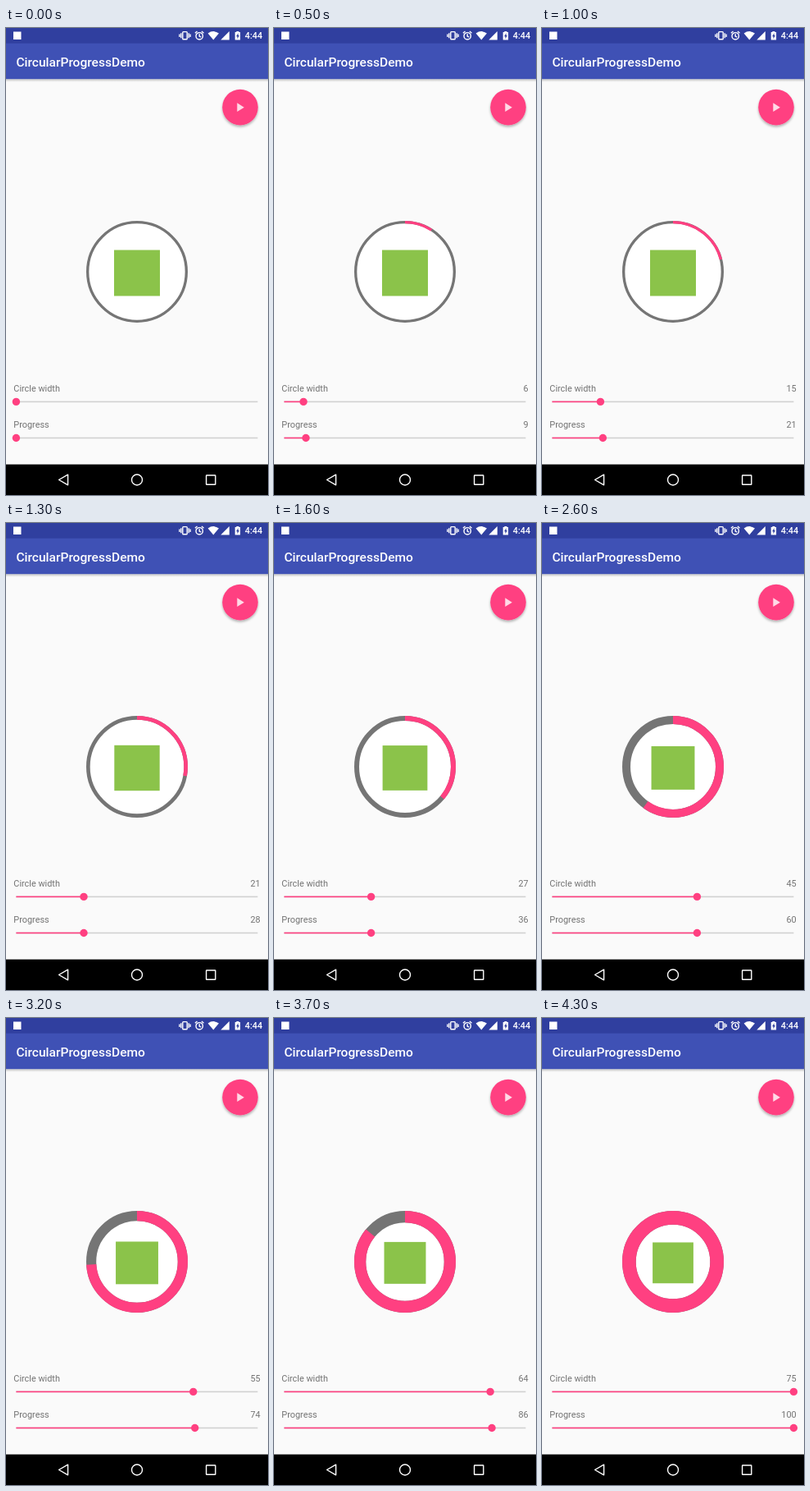
These frames come from a looping animation (320 by 569 pixels, 4400 ms). An HTML page:

```html
<!DOCTYPE html>
<html lang="en">
<head>
<meta charset="utf-8">
<title>CircularProgressDemo</title>
<style>
  html, body { margin: 0; width: 100%; height: 100%; overflow: hidden; background: #fafafa; }
  svg { display: block; width: 100%; height: 100%; }
  text { font: 10.89px Roboto, sans-serif; fill: #737373; }
  .title { font-size: 15.56px; font-weight: 500; fill: #fff; }
  .clock { font-weight: 500; fill: #fff; }
  .value { text-anchor: end; }
  .accent { fill: #ff4081; }
  .line { fill: none; stroke: #fff; stroke-width: 1.4; }
</style>
</head>
<body>
<svg viewBox="0 0 320 569">
  <defs>
    <linearGradient id="barShadow" x2="0" y2="1">
      <stop stop-color="#000" stop-opacity=".22"/>
      <stop offset="1" stop-color="#000" stop-opacity="0"/>
    </linearGradient>
    <filter id="buttonShadow" x="-30%" y="-30%" width="160%" height="160%">
      <feDropShadow dx="0" dy="2" stdDeviation="1.8" flood-opacity=".3"/>
    </filter>
  </defs>

  <rect width="320" height="569" fill="#fafafa"/>
  <rect y="62.2" width="320" height="3.6" fill="url(#barShadow)"/>
  <rect width="320" height="62.2" fill="#3f51b5"/>
  <rect width="320" height="18.7" fill="#303f9f"/>
  <text class="title" x="12.4" y="46.5">CircularProgressDemo</text>

  <!-- Status bar -->
  <rect x="9" y="4.5" width="9.5" height="9.5" fill="#fff"/>
  <rect class="line" x="215.8" y="4.6" width="5.4" height="9.2" rx=".8"/>
  <path class="line" stroke-width="1" d="M213.8 6.2v6M211.9 7.5v3.4M223.2 6.2v6M225.1 7.5v3.4"/>
  <circle class="line" cx="236.2" cy="9.8" r="4.2"/>
  <path class="line" d="M236.2 7.2v2.8l2 1.2M230.9 6.2l2.6-2.2M241.5 6.2l-2.6-2.2"/>
  <path fill="#fff" d="M246.6 6.4Q253.3 1.8 260 6.4L253.3 14.4ZM262.3 14.4H272.8V3.9Z"/>
  <path fill="#fff" d="M279.7 5h1.7V3.9h3V5h1.7v9.6h-6.4Z"/>
  <path fill="#303f9f" d="M283.6 6.3l-2.5 4h1.4v2.9l2.4-4.1h-1.3Z"/>
  <text class="clock" x="291.8" y="13.3">4:44</text>

  <!-- Play button -->
  <circle class="accent" cx="286" cy="96.6" r="21.8" filter="url(#buttonShadow)"/>
  <path d="M282.3 91.2v10.9l8.6-5.45Z" fill="#fff" opacity=".8"/>

  <!-- Circular progress -->
  <circle cx="160" cy="297" r="61" fill="#fff"/>
  <g fill="none" transform="rotate(-90 160 297)">
    <circle class="ring" cx="160" cy="297" stroke="#757575"/>
    <circle class="ring" id="arc" cx="160" cy="297" stroke="#ff4081" pathLength="100"/>
  </g>
  <g transform="translate(160 297)">
    <rect id="badge" x="-28" y="-26.5" width="56" height="56" fill="#8bc34a"/>
  </g>

  <g id="sliders"></g>

  <!-- Navigation bar -->
  <rect y="531.7" width="320" height="37.3"/>
  <path class="line" stroke-linejoin="round" d="M64.6 550.5L75.6 544.2V556.8Z"/>
  <circle class="line" cx="160" cy="550.5" r="6.5"/>
  <rect class="line" x="244.6" y="545" width="11.2" height="11.2" rx=".5"/>
</svg>
<script>
const DURATION = 4400, STEP = 100;
const TRACK_X = 12.4, TRACK_LENGTH = 295;
const RADIUS = 62, MAX_WIDTH = 75, MIN_WIDTH = 15, PIXELS_PER_UNIT = 1 / 4.5;
const byId = id => document.getElementById(id);

function addSlider(label, y, max) {
  byId('sliders').insertAdjacentHTML('beforeend', `<g>
    <text x="9.3" y="${y - 12.8}">${label}</text>
    <text class="value" x="310.7" y="${y - 12.8}"></text>
    <rect x="${TRACK_X}" y="${y - .8}" width="${TRACK_LENGTH}" height="1.6" fill="#d1d1d1"/>
    <rect class="accent fill" x="${TRACK_X}" y="${y - .8}" height="1.6"/>
    <circle class="accent thumb" cy="${y}" r="4.7"/></g>`);
  const group = byId('sliders').lastElementChild;
  const [value, fill, thumb] = ['.value', '.fill', '.thumb'].map(s => group.querySelector(s));
  return amount => {
    const length = TRACK_LENGTH * amount / max;
    value.textContent = amount || '';
    fill.setAttribute('width', length);
    thumb.setAttribute('cx', TRACK_X + length);
  };
}

const setWidth = addSlider('Circle width', 455.4, MAX_WIDTH);
const setProgress = addSlider('Progress', 499.5, 100);
const rings = document.querySelectorAll('.ring');

function draw(time) {
  const t = Math.floor(time % DURATION / STEP) * STEP;
  const progress = Math.min(100, Math.max(0, Math.round((t - 120) * .024)));
  const width = Math.floor(progress * MAX_WIDTH / 100);
  const stroke = Math.max(MIN_WIDTH, width) * PIXELS_PER_UNIT;
  const radius = RADIUS - stroke / 2;

  setWidth(width);
  setProgress(progress);
  for (const ring of rings) {
    ring.setAttribute('r', radius);
    ring.setAttribute('stroke-width', stroke);
  }
  byId('arc').setAttribute('stroke-dasharray', progress < 100 ? `${progress} 100` : 'none');
  byId('arc').setAttribute('visibility', progress ? 'visible' : 'hidden');
  const restRadius = RADIUS - MIN_WIDTH * PIXELS_PER_UNIT / 2;
  byId('badge').setAttribute('transform', `scale(${radius / restRadius})`);
}

const start = performance.now();
function tick() {
  draw(performance.now() - start);
  requestAnimationFrame(tick);
}
tick();
</script>
</body>
</html>
```
